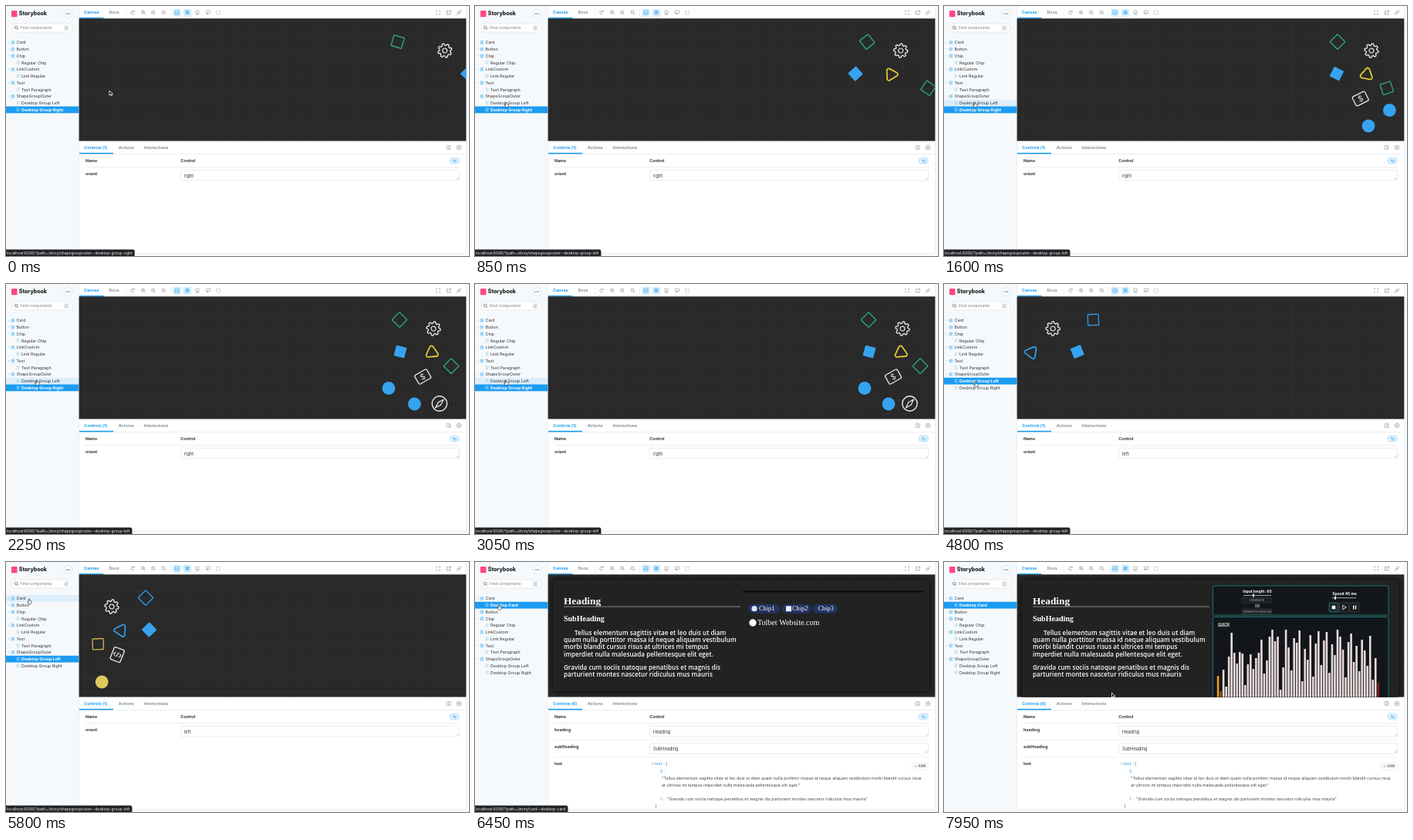
Recreate the animation shown at these times as an HTML page with a canvas. Size 600x325 px, loop 8 s.

```html
<!DOCTYPE html>
<html lang="en">
<head>
<meta charset="utf-8">
<title>Component workshop</title>
<style>
html, body { margin: 0; width: 100%; height: 100%; overflow: hidden; background: #f6f9fc; }
canvas { display: block; width: 600px; height: 325px; }
</style>
</head>
<body>
<canvas id="stage"></canvas>
<script>
const canvas = document.getElementById('stage');
const c = canvas.getContext('2d');
const dpr = window.devicePixelRatio || 1;
canvas.width = 600 * dpr;
canvas.height = 325 * dpr;

const LOOP = 8000, TO_LEFT = 3380, TO_CARD = 6130, FRAME_LOADED = 6900;
const BLUE = '#1b9cf2', INK = '#333', GREY = '#8a8f94', LINE = '#e3e7ea';
const UI = 'Inter, sans-serif', SERIF = '"Liberation Serif", serif', BODY = '"Open Sans", sans-serif';

// ---- helpers ----
const lerp = (a, b, k) => a + (b - a) * k;
const clamp = k => Math.max(0, Math.min(1, k));
const smooth = k => k * k * (3 - 2 * k);

// CSS "ease" curve: cubic-bezier(.25, .1, .25, 1)
function ease(x) {
  if (x <= 0 || x >= 1) return clamp(x);
  const bez = (u, a, b) => 3 * u * (1 - u) ** 2 * a + 3 * u * u * (1 - u) * b + u ** 3;
  let lo = 0, hi = 1;
  for (let i = 0; i < 24; i++) {
    const mid = (lo + hi) / 2;
    if (bez(mid, .25, .25) < x) lo = mid; else hi = mid;
  }
  return bez(lo, .1, 1);
}

function text(str, x, y, size, color = INK, weight = 400, family = UI, align = 'left') {
  c.font = `${weight} ${size}px ${family}`;
  c.fillStyle = color;
  c.textAlign = align;
  c.textBaseline = 'alphabetic';
  c.fillText(str, x, y + size * .35);
}

function rect(x, y, w, h, fill) {
  c.fillStyle = fill;
  c.fillRect(x, y, w, h);
}

function box(x, y, w, h, r, fill, stroke, lw = .6) {
  c.beginPath();
  c.roundRect(x, y, w, h, r);
  if (fill) { c.fillStyle = fill; c.fill(); }
  if (stroke) { c.strokeStyle = stroke; c.lineWidth = lw; c.stroke(); }
}

function disc(x, y, r, fill, stroke, lw = .7) {
  c.beginPath();
  c.arc(x, y, r, 0, 7);
  if (fill) { c.fillStyle = fill; c.fill(); }
  if (stroke) { c.strokeStyle = stroke; c.lineWidth = lw; c.stroke(); }
}

function path(points, stroke, lw = .7, close = false, fill) {
  c.beginPath();
  points.forEach(([x, y]) => c.lineTo(x, y));
  if (close) c.closePath();
  if (fill) { c.fillStyle = fill; c.fill(); }
  if (stroke) { c.strokeStyle = stroke; c.lineWidth = lw; c.lineJoin = 'round'; c.stroke(); }
}

function at(x, y, deg, draw) {
  c.save();
  c.translate(x, y);
  c.rotate(deg * Math.PI / 180);
  draw();
  c.restore();
}

// ---- floating shapes ----
const square = col => box(-7, -7, 14, 14, .8, null, col, 1.4);
const block = col => box(-7, -7, 14, 14, 1, col);
const ball = col => disc(0, 0, 8.4, col);

function triangle(col) {
  const p = [-90, 30, 150].map(a => [11 * Math.cos(a * Math.PI / 180), 11 * Math.sin(a * Math.PI / 180)]);
  c.beginPath();
  c.moveTo((p[0][0] + p[2][0]) / 2, (p[0][1] + p[2][1]) / 2);
  for (let i = 0; i < 3; i++) c.arcTo(...p[i], ...p[(i + 1) % 3], 2.4);
  c.closePath();
  c.strokeStyle = col;
  c.lineWidth = 1.8;
  c.stroke();
}

function gear(col) {
  c.beginPath();
  for (let a = 0; a <= 360; a += 4) {
    const r = 8 + 1.1 * Math.max(-1, Math.min(1, 2 * Math.cos(a * 8 * Math.PI / 180)));
    c.lineTo(r * Math.cos(a * Math.PI / 180), r * Math.sin(a * Math.PI / 180));
  }
  c.closePath();
  c.strokeStyle = col;
  c.lineWidth = 1.3;
  c.stroke();
  disc(0, 0, 3, null, col, 1.2);
}

function coin(col) {
  box(-9, -6.7, 18, 13.4, 2, null, col, 1.3);
  text('$', 0, 0, 10, col, 400, UI, 'center');
}

function code(col) {
  box(-7, -8.5, 14, 17, 2, null, col, 1.3);
  path([[-2.6, -2.4], [-5, 0], [-2.6, 2.4]], col, 1.1);
  path([[2.6, -2.4], [5, 0], [2.6, 2.4]], col, 1.1);
  path([[1, -3.2], [-1, 3.2]], col, 1.1);
}

function compass(col) {
  disc(0, 0, 9.7, null, col, 1.4);
  path([[5, -5.5], [1.6, 1.8], [-5, 5.5], [-1.6, -1.8]], col, 1.2, true);
}

// start time, y, x: from / overshoot / rest, angle: from / overshoot / rest, drawing for right and left
const SHAPES = [
  { s: -800, y: 46.5, x: [639, 497, 510], r: [310, 90, 45], right: [square, '#2ea27b'], left: [square, '#2d93dc'] },
  { s: -600, y: 58, x: [649, 549, 554], r: [150, 0, 10], right: [gear, '#eee'], left: [gear, '#eee'] },
  { s: -100, y: 88, x: [607, 490, 511], r: [232, 135, 15], right: [block, '#35a3f0'], left: [block, '#35a3f0'] },
  { s: 10, y: 89, x: [657, 532, 552], r: [300, 75, -5], right: [triangle, '#e2c935'], left: [triangle, '#2f9dea'] },
  { s: 200, y: 106.7, x: [671, 571.5, 577], r: [310, 90, 45], right: [square, '#2ea27b'], left: [square, '#c5ad48'] },
  { s: 700, y: 120.5, x: [655, 535, 542], r: [60, -30, -30], turn: 43, right: [coin, '#e6e6e6'], left: [code, '#eee'] },
  { s: 1150, y: 135.5, x: [728, 495, 505], r: [0, 0, 0], right: [ball, '#35a3f0'], left: [ball, '#35a3f0'] },
  { s: 1000, y: 156, x: [636, 529, 536], r: [0, 0, 0], right: [ball, '#35a3f0'], left: [ball, '#dccb5c'] },
  { s: 1350, y: 155.5, x: [655, 558, 564], r: [90, 0, 0], right: [compass, '#eee'], left: [compass, '#eee'] }
];

function track([from, over, rest], p) {
  return p < 1200 ? lerp(from, over, ease(p / 1200)) : lerp(over, rest, ease((p - 1200) / 800));
}

function drawShapes(t) {
  const left = t >= TO_LEFT;
  const clock = left ? t - 4350 : t;
  for (const sh of SHAPES) {
    const p = clock - sh.s;
    if (p < 0) continue;
    const x = track(sh.x, p);
    const turn = track(sh.r, p) + (left && sh.turn || 0);
    const [draw, col] = left ? sh.left : sh.right;
    at(left ? 691 - x : x, sh.y, turn, () => draw(col));
  }
}

// ---- card story ----
const BARS = [27, 7, 35, 13, 52, 83, 57, 43, 58, 56, 15, 42, 55, 36, 50, 57, 74, 30, 47, 78, 87, 72, 78, 9, 38,
  87, 64, 34, 76, 70, 86, 20, 62, 48, 80, 26, 69, 85, 41, 73, 84, 31, 68, 54, 87, 78, 61, 25, 71, 82, 45, 66,
  33, 74, 60, 40, 79, 22, 50, 18];

function slider(x, y, w, knob) {
  rect(x, y - .4, w, .8, '#ccc');
  rect(knob - .9, y - 2, 1.8, 4, '#fff');
}

function smallButton(label, y) {
  box(386, y, 39, 6.5, 1, '#1c1f22', '#43474a', .5);
  text(label, 405.5, y + 3.3, 3.7, '#aaa', 400, UI, 'center');
}

function drawSorter() {
  const teal = '#16817f', bg = '#12161a';
  box(348.5, 31, 227.5, 38, 1.5, bg, teal, .9);
  text('Input length: 60', 406, 38.2, 4.8, '#fff', 700, UI, 'center');
  slider(388, 43.5, 36, 401);
  smallButton('GENERATE', 46.6);
  text('OR', 406, 57.3, 4.6, '#ddd', 500, UI, 'center');
  smallButton('GENERATE RANDOM', 61);
  text('Speed:45 ms', 519, 41.4, 4.9, '#fff', 700, UI, 'center');
  slider(503, 46.7, 31, 507);
  [499, 512.5, 526].forEach((x, i) => box(x, 53, 12, 12, 1, i ? '#191c1f' : '#24282b', i ? '#444' : '#2a8d8b', .7));
  rect(502.8, 56.8, 4.4, 4.4, '#fff');
  path([[516.7, 56.3], [521.3, 59], [516.7, 61.7]], '#fff', .8, true);
  rect(530, 56.5, 1.4, 5, '#fff');
  rect(532.8, 56.5, 1.4, 5, '#fff');

  box(348.5, 71.5, 227.5, 120, 1.5, bg, teal, .9);
  text('QUICK', 355, 81, 4.8, '#fff', 600);
  rect(355, 83.3, 14.5, .5, '#fff');
  BARS.forEach((h, i) => {
    const col = i === 0 ? '#f09a16' : i === 1 ? '#85531f' : i === BARS.length - 1 ? '#8c1816' : '#e8dada';
    rect(353.8 + i * 3.52, 175 - h, 2.6, h + 1, col);
  });
}

function drawChips() {
  rect(347, 37.4, 235, 2, '#0b0b0b');
  [[354, 41, 'Chip1', 368], [397.5, 39, 'Chip2', 411], [438, 32, 'Chip3', 444.5]].forEach(([x, w, label, tx]) => {
    box(x, 54.7, w, 12, 6, '#21325f');
    text(label, tx, 60.5, 8.3, '#fff', 400, SERIF);
  });
  disc(362, 60.7, 3.6, '#dfe6f3');
  rect(403, 57.2, 7, 7, '#eef2f8');
  disc(360, 79, 4.7, '#fff');
  text('Tolbet Website.com', 366, 78.6, 10.1, '#fff', 400, SERIF);
}

function drawCard(t) {
  const loaded = t >= FRAME_LOADED;
  c.save();
  c.shadowColor = 'rgba(0,0,0,.95)';
  c.shadowBlur = 9 * dpr;
  box(101, 23, 488, loaded ? 220 : 145, 4, '#222');
  c.restore();
  text('Heading', 115, 50, 13.3, '#fff', 700, SERIF);
  rect(115, 57.4, 229, 1.2, '#777');
  text('SubHeading', 115, 73, 10, '#fff', 700, SERIF);
  c.letterSpacing = '0.06px';
  [
    [129, 91.9, 'Tellus elementum sagittis vitae et leo duis ut diam'],
    [115, 101, 'quam nulla porttitor massa id neque aliquam vestibulum'],
    [115, 110.4, 'morbi blandit cursus risus at ultrices mi tempus'],
    [115, 119.7, 'imperdiet nulla malesuada pellentesque elit eget.'],
    [115, 136.8, 'Gravida cum sociis natoque penatibus et magnis dis'],
    [115, 146.2, 'parturient montes nascetur ridiculus mus mauris']
  ].forEach(([x, y, s]) => text(s, x, y, 8, '#fff', 600, BODY));
  c.letterSpacing = '0px';
  if (loaded) drawSorter(); else drawChips();
}

function drawPreview(t) {
  c.save();
  c.beginPath();
  c.rect(94.6, 16.3, 501.7, 159.3);
  c.clip();
  rect(94, 16, 503, 160, '#292929');
  for (let i = 0; i < 60; i++) {
    const col = i % 5 ? 'rgba(255,255,255,.018)' : 'rgba(255,255,255,.045)';
    rect(102 + i * 8.7, 16, .6, 160, col);
    if (i < 19) rect(94, 20 + i * 8.7, 503, .6, col);
  }
  if (t < TO_CARD) drawShapes(t); else drawCard(t);
  c.restore();
}

// ---- sidebar ----
const TREE = [
  ['Card', 'Desktop Card'], ['Button'], ['Chip', 'Regular Chip'], ['LinkCustom', 'Link Regular'],
  ['Text', 'Text Paragraph'], ['ShapeGroupOuter', 'Desktop Group Left', 'Desktop Group Right']
];
const rowY = i => 47.4 + i * 8.75;

function drawRow(label, i, isStory, selected, hovered) {
  const y = rowY(i);
  if (selected || hovered) rect(0, y - 4.4, 94.5, 8.8, selected ? BLUE : '#dceefb');
  if (isStory) {
    path([[14.2, y - 1.9], [16.8, y - 1.9], [16.8, y + 1.9], [15.5, y + .8], [14.2, y + 1.9]], selected ? '#fff' : '#7cc7dc', .5, true);
    text(label, 20, y, 5.4, selected ? '#fff' : INK, selected ? 700 : 400);
  } else {
    path([[2.3, y - .6], [4.3, y - .6], [3.3, y + .7]], null, 0, true, '#b5bac0');
    [6.9, 9.1].forEach(x => [-2, .2].forEach(d => box(x, y + d, 1.8, 1.8, .3, null, '#4bb4f5', .5)));
    text(label, 13.5, y, 5.35);
  }
}

function drawSidebar(t) {
  rect(0, 0, 95, 325, '#f6f9fc');
  box(7, 6, 7.5, 8.2, .8, '#ff4785');
  text('Storybook', 16.8, 10, 7, '#222', 800);
  disc(80.5, 10, 5.4, '#fff', '#cfd8df', .7);
  [-2, 0, 2].forEach(d => disc(80.5 + d, 10, .65, '#555'));
  box(7.5, 23, 78.5, 11, 5.5, '#fff', '#d9dfe4');
  disc(13.3, 28, 1.9, null, '#555');
  path([[14.7, 29.4], [16, 30.8]], '#555');
  text('Find components', 19, 28.6, 4.95, '#777');
  box(75, 25.3, 6.5, 6.5, 1, '#e3e6e8');
  text('/', 78.2, 28.5, 4.6, '#777', 400, UI, 'center');

  const selected = t < TO_LEFT ? 'Desktop Group Right' : t < TO_CARD ? 'Desktop Group Left' : 'Desktop Card';
  const [, cy] = cursorAt(t);
  const onSide = t > 870 && t < 7550;
  let i = 0;
  TREE.forEach(([name, ...stories]) => {
    const open = name !== 'Card' || t >= TO_CARD;
    [name, ...(open ? stories : [])].forEach((label, n) => {
      const hovered = onSide && Math.abs(cy - rowY(i)) < 4.38;
      drawRow(label, i++, n > 0, n > 0 && label === selected, hovered);
    });
  });
}

// ---- toolbar and controls ----
function zoomIcon(x, sign) {
  disc(x - .5, 8, 2, null, GREY);
  path([[x + 1, 9.5], [x + 2.6, 11]], GREY);
  if (sign) path([[x - 1.5, 8], [x + .5, 8]], GREY, .5);
  if (sign > 0) path([[x - .5, 7], [x - .5, 9]], GREY, .5);
}

function drawToolbar() {
  rect(95, 0, 501, 17, '#fff');
  text('Canvas', 101, 8.5, 5.35, BLUE, 700);
  rect(95, 14.9, 31.5, 1.5, BLUE);
  text('Docs', 133.5, 8.5, 5.35, GREY, 700);
  rect(155.5, 4, .6, 9, LINE);
  c.beginPath();
  c.arc(164, 8.5, 2.2, .5, 5.6);
  c.strokeStyle = GREY;
  c.lineWidth = .7;
  c.stroke();
  path([[166.4, 5.6], [166.2, 7.5], [164.4, 7.2]], GREY);
  zoomIcon(178, 1);
  zoomIcon(191, -1);
  zoomIcon(204.5, 0);
  rect(213, 4, .6, 9, LINE);
  box(216, 3.4, 11, 10.4, 2, '#d9effd');
  box(229.5, 3.4, 11, 10.4, 2, '#d9effd');
  box(219, 6, 5, 5, .5, null, BLUE);
  path([[219, 10], [220.6, 8.4], [222, 9.4], [224, 8]], BLUE, .6);
  [232.9, 235.4].forEach(x => [6.2, 8.7].forEach(y => box(x, y, 1.8, 1.8, .2, null, BLUE, .6)));
  box(246, 6, 4, 3.5, .3, null, GREY);
  rect(245.5, 10.6, 5, .7, GREY);
  box(259.5, 6, 5, 3.7, .3, null, GREY);
  rect(260.8, 8.5, 1, 2.8, GREY);
  c.setLineDash([1, .7]);
  box(272.5, 6.2, 5, 4.8, .3, null, GREY);
  c.setLineDash([]);
  [[-1, -1], [1, -1], [-1, 1], [1, 1]].forEach(([a, b]) => {
    path([[560 + a, 8.5 + b * 2.4], [560 + a * 2.4, 8.5 + b * 2.4], [560 + a * 2.4, 8.5 + b]], GREY);
  });
  path([[573.5, 6.5], [571.5, 6.5], [571.5, 11], [576, 11], [576, 9]], GREY);
  path([[573.6, 9], [576.4, 6.2]], GREY);
  path([[574.6, 6], [576.5, 6], [576.5, 7.9]], GREY);
  at(587, 8.5, -45, () => {
    box(-3.2, -1.2, 3.6, 2.4, 1.2, null, GREY);
    box(-.4, -1.2, 3.6, 2.4, 1.2, null, GREY);
  });
}

function field(label, value, y) {
  text(label, 103, y + 4.7, 5.3, INK, 700);
  box(226.3, y, 361.4, 13.6, 2, '#fff', '#d9dee2');
  text(value, 231, y + 7.3, 5.6);
  path([[584, y + 12.4], [586.5, y + 9.9]], '#999', .5);
  path([[585.4, y + 12.4], [586.5, y + 11.3]], '#999', .5);
}

function drawTextControl() {
  const quoted = (s, x, y) => text(s, x, y, 5.35, '#444');
  text('text', 103, 262, 5.3, INK, 700);
  rect(229, 262, 2.4, .6, '#777');
  text('text', 233, 262.5, 5.35, BLUE);
  text(': [', 244.3, 262.5, 5.35, '#555');
  text('0 :', 240, 272, 5.2, BLUE);
  quoted('"Tellus elementum sagittis vitae et leo duis ut diam quam nulla porttitor massa id neque aliquam vestibulum morbi blandit cursus risus', 242, 281.6);
  quoted('at ultrices mi tempus imperdiet nulla malesuada pellentesque elit eget."', 242, 289.8);
  text('1 :', 240, 308, 5.2, BLUE);
  quoted('"Gravida cum sociis natoque penatibus et magnis dis parturient montes nascetur ridiculus mus mauris"', 249, 308);
  text(']', 233.5, 317.5, 5.2, '#555');
  box(566.5, 261, 20.5, 9, 2, '#fff', '#dfe3e6');
  disc(571.3, 265.5, 1.4, null, GREY, .6);
  text('RAW', 574.5, 265.5, 4.2, '#777', 700);
}

function drawControls(t) {
  const card = t >= TO_CARD;
  rect(95, 175, 501, 146, '#fff');
  rect(95, 192, 501, .7, LINE);
  text(`Controls (${card ? 6 : 1})`, 101.3, 184, 5.35, BLUE, 700);
  rect(95, 190.8, 44, 1.6, BLUE);
  text('Actions', 145.7, 184, 5.4, GREY, 700);
  text('Interactions', 178.6, 184, 5.45, GREY, 700);
  box(571, 181.7, 5, 4.6, .5, null, GREY);
  rect(573.7, 181.7, .6, 4.6, GREY);
  disc(587, 184, 2.8, null, GREY);
  path([[586, 183], [588, 185]], GREY);
  path([[588, 183], [586, 185]], GREY);
  text('Name', 103, 201, 5.3, INK, 700);
  text('Control', 226.3, 201, 5.3, INK, 700);
  box(575, 197, 12.4, 8, 4, '#dff1fd', '#9fd3f6');
  path([[580.4, 199.3], [579, 200.6], [580.4, 201.9]], BLUE, .6);
  path([[579, 200.6], [583, 200.6], [583, 202.8], [580.6, 202.8]], BLUE, .6);
  rect(103, 209, 485, .7, LINE);
  if (card) {
    field('heading', 'Heading', 213.3);
    rect(103, 231.3, 485, .6, LINE);
    field('subHeading', 'SubHeading', 235.6);
    rect(103, 253.6, 485, .6, LINE);
    drawTextControl();
  } else {
    field('orient', t < TO_LEFT ? 'right' : 'left', 213.3);
  }
}

function drawStatus(t) {
  if (t > 7720) return;
  const story = t < 830 ? 'shapegroupouter--desktop-group-right'
    : t < 6330 ? 'shapegroupouter--desktop-group-left' : 'card--desktop-card';
  const label = 'localhost:6006/?path=/story/' + story;
  c.font = `400 5.03px ${UI}`;
  const w = c.measureText(label).width + 4;
  box(-2, 316.7, w + 2, 10, [0, 2, 0, 0], '#1f2124', '#4a4c4f', .5);
  text(label, 1, 321, 5.03, '#f2f2f2');
}

// ---- pointer ----
const MOVES = [[0, 134, 110], [100, 134, 110], [880, 40, 125], [3300, 40, 125], [3600, 41, 127],
  [5200, 41, 127], [5700, 30, 48], [6150, 30, 48], [6400, 31, 55.5], [7300, 31, 55.5], [7900, 217.5, 170], [8000, 217.5, 170]];

function cursorAt(t) {
  const i = MOVES.findIndex(m => m[0] > t);
  const [t0, x0, y0] = MOVES[i - 1], [t1, x1, y1] = MOVES[i];
  const k = smooth((t - t0) / (t1 - t0));
  return [lerp(x0, x1, k), lerp(y0, y1, k)];
}

function drawCursor(t) {
  const [x, y] = cursorAt(t);
  at(x, y, 0, () => {
    if (x < 94) {
      path([[-.6, 0], [.6, 0], [.7, 2.3], [3.2, 3], [3, 5], [2.2, 6.6], [-.8, 6.6], [-2.5, 4], [-1.9, 3.5], [-.7, 4.4]], '#222', .6, true, '#fff');
    } else {
      path([[0, 0], [0, 6.2], [1.5, 4.9], [2.5, 7], [3.5, 6.5], [2.6, 4.5], [4.5, 4.4]], '#fff', .8, true, '#111');
    }
  });
}

function frame() {
  const t = performance.now() % LOOP;
  c.setTransform(dpr, 0, 0, dpr, 0, 0);
  rect(0, 0, 600, 325, '#f6f9fc');
  drawSidebar(t);
  drawToolbar();
  drawControls(t);
  rect(94.5, 0, .6, 321, '#dfe5ea');
  rect(596, 0, .6, 321, '#e3e8ec');
  rect(95, 321, 501, .6, '#dfe5ea');
  drawPreview(t);
  drawStatus(t);
  drawCursor(t);
  requestAnimationFrame(frame);
}
frame();
</script>
</body>
</html>
```
